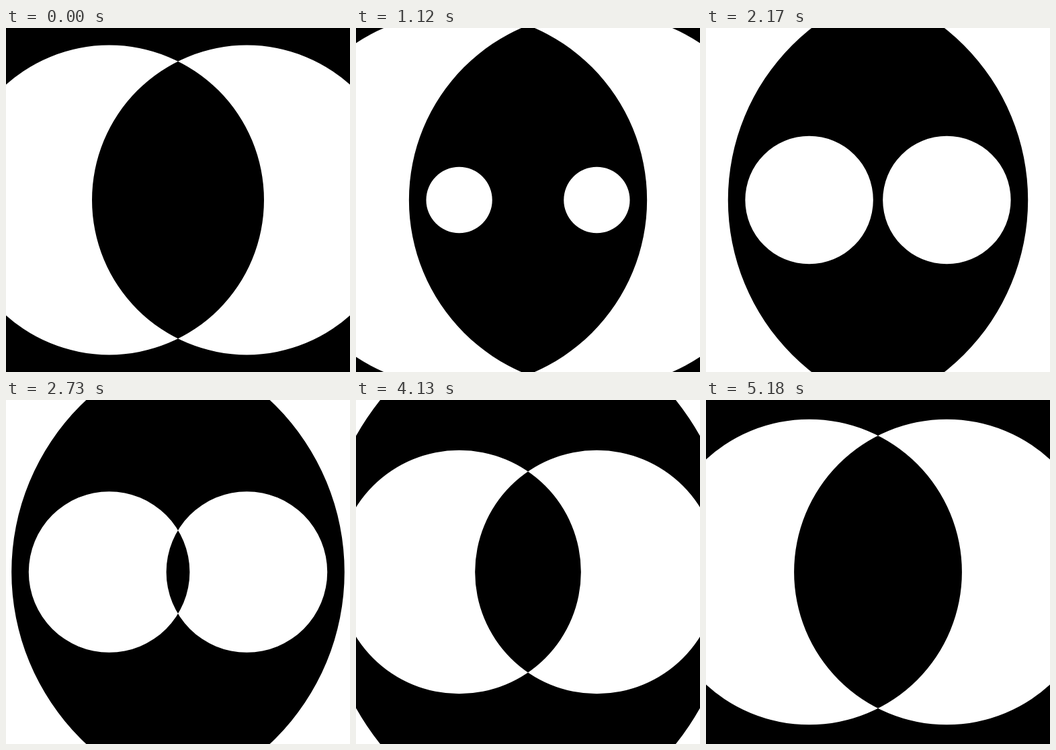
Write an HTML page with a canvas that moves like this. It is 512x512 px and loops after 5.25 s.

```html
<!DOCTYPE html>
<html lang="en">
<head>
<meta charset="utf-8">
<title>Crossing ripples</title>
<style>
  html, body { margin: 0; width: 100%; height: 100%; overflow: hidden; background: #000; }
  canvas { display: block; width: 100vw; height: 100vh; }
</style>
</head>
<body>
<canvas id="stage" width="512" height="512"></canvas>
<script>
const SIZE = 512;
const STEP = 70;
const STEPS = 75;
const SPACING = SIZE * 0.45;
const CENTERS = [SIZE * 0.3, SIZE * 0.7];
const ctx = document.getElementById('stage').getContext('2d');

function addCircle(x, r) {
  if (r <= 0) return;
  ctx.moveTo(x + r, SIZE / 2);
  ctx.arc(x, SIZE / 2, r, 0, Math.PI * 2);
  ctx.closePath();
}

// Two sets of growing rings; the even-odd fill inverts every overlap.
function draw(progress) {
  const r = SPACING * progress;
  ctx.fillStyle = '#000';
  ctx.fillRect(0, 0, SIZE, SIZE);
  ctx.beginPath();
  for (const x of CENTERS) {
    addCircle(x, r);
    addCircle(x, r + SPACING);
  }
  ctx.fillStyle = '#fff';
  ctx.fill('evenodd');
}

let start = null;
function tick(now) {
  if (start === null) start = now;
  const step = Math.floor(Math.max(0, now - start) / STEP) % STEPS;
  draw(step / STEPS);
  requestAnimationFrame(tick);
}

draw(0);
requestAnimationFrame(tick);
</script>
</body>
</html>
```
